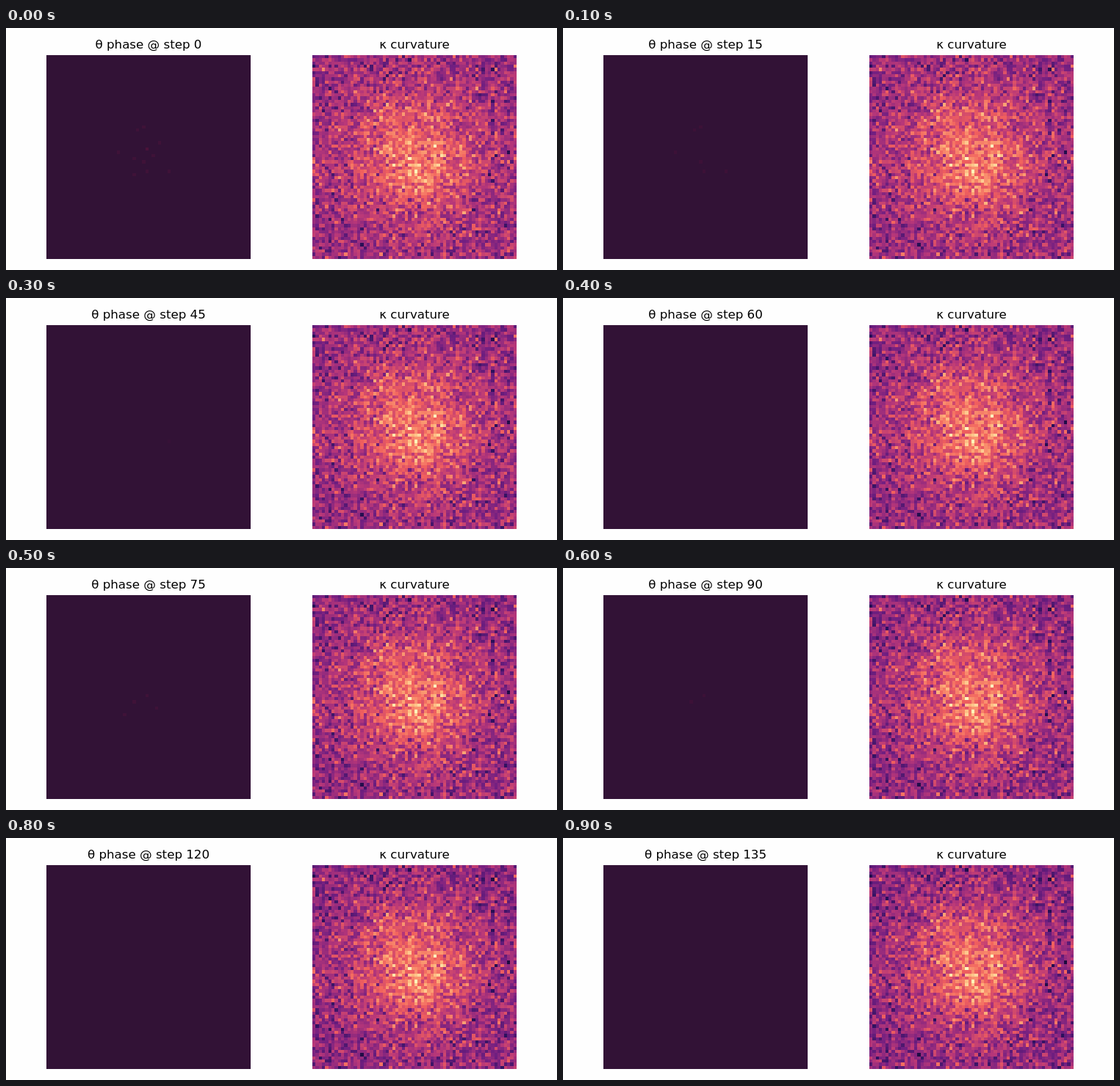
These frames come from a looping animation (750x330 px, 1 s). An HTML page with a canvas:

```html
<!DOCTYPE html>
<html lang="en">
<head>
<meta charset="utf-8">
<title>Phase and curvature</title>
<style>
  html, body { margin: 0; width: 100%; height: 100%; overflow: hidden; background: #fefefe; }
  canvas { display: block; }
</style>
</head>
<body>
<canvas id="stage" width="750" height="330"></canvas>
<script>
const ctx = document.getElementById('stage').getContext('2d');
const N = 64, SIZE = 278, TOP = 37, LEFT = 55, RIGHT = 417;
const FRAMES = 10, FRAME_MS = 100, STEP = 15;

// Heat scale from dark to light, evenly spaced
const SCALE = [0x000004, 0x2c115f, 0x721f81, 0xb73779, 0xf1605d, 0xfeb078, 0xfcfdbf]
  .map(c => [c >> 16, c >> 8 & 255, c & 255]);

let seed = 42;
function random() {
  seed = (seed + 0x6D2B79F5) | 0;
  let h = Math.imul(seed ^ seed >>> 15, 1 | seed);
  h = h + Math.imul(h ^ h >>> 7, 61 | h) ^ h;
  return ((h ^ h >>> 14) >>> 0) / 4294967296;
}

function gauss() {
  return Math.sqrt(-2 * Math.log(1 - random())) * Math.cos(2 * Math.PI * random());
}

// Noise over a central bump; the surroundings slowly darken
const field = Array.from({ length: N * N }, (_, i) => {
  const dx = i % N - 31.5, dy = Math.floor(i / N) - 31.5;
  const bump = Math.exp(-(dx * dx + dy * dy) / 370);
  return { level: .43 + .3 * bump + .1 * gauss(), drift: -.035 * (1 - bump) };
});

// A burst of faint spots near the centre, halving in number every frame
function burst(start, count) {
  const spots = Array.from({ length: count }, () =>
    [Math.round(31 + 4 * gauss()), Math.round(31 + 4 * gauss())]);
  return { start, spots };
}
const bursts = [burst(0, 12), burst(5, 4)];

function heat(v) {
  const p = Math.max(0, Math.min(.9999, v)) * (SCALE.length - 1);
  const k = Math.floor(p);
  return `rgb(${SCALE[k].map((c, i) => Math.round(c + (SCALE[k + 1][i] - c) * (p - k)))})`;
}

const edge = i => Math.round(i * SIZE / N);

function cell(left, col, row, color) {
  const x = edge(col), y = edge(row);
  ctx.fillStyle = color;
  ctx.fillRect(left + x, TOP + y, edge(col + 1) - x, edge(row + 1) - y);
}

function title(text, left) {
  ctx.fillStyle = '#000';
  ctx.fillText(text, left + SIZE / 2, 28);
}

function draw(frame) {
  ctx.fillStyle = '#fefefe';
  ctx.fillRect(0, 0, 750, 330);
  ctx.font = '16.667px "DejaVu Sans", sans-serif';
  ctx.textAlign = 'center';
  title(`θ phase @ step ${frame * STEP}`, LEFT);
  title('κ curvature', RIGHT);

  ctx.fillStyle = '#321236';
  ctx.fillRect(LEFT, TOP, SIZE, SIZE);
  for (const { start, spots } of bursts) {
    const age = frame - start;
    if (age < 0) continue;
    for (const [col, row] of spots.slice(0, spots.length >> age)) {
      cell(LEFT, col, row, `rgba(150, 16, 72, ${.13 * .7 ** age})`);
    }
  }

  const progress = frame / (FRAMES - 1);
  field.forEach(({ level, drift }, i) =>
    cell(RIGHT, i % N, Math.floor(i / N), heat(level + drift * progress)));
}

let shown = -1;
function tick() {
  const frame = Math.floor(performance.now() / FRAME_MS) % FRAMES;
  if (frame !== shown) draw(shown = frame);
  requestAnimationFrame(tick);
}
tick();
</script>
</body>
</html>
```
